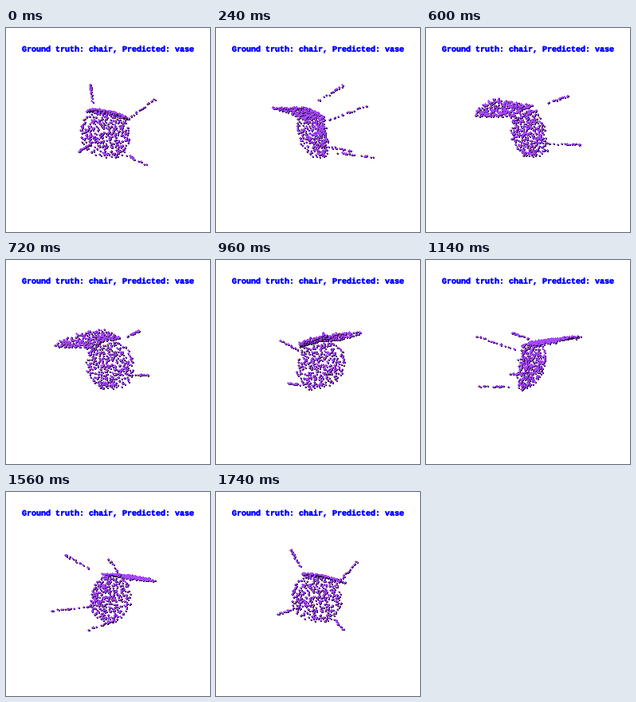
Write a matplotlib script that moves like this. It is 256 by 256 pixels and loops after 1.8 s.

```python
import numpy as np
import matplotlib.pyplot as plt
from matplotlib.animation import FuncAnimation
from matplotlib.patheffects import withStroke

SIZE, FRAMES, STEP_MS = 256, 30, 60
CAMERA = 221.7  # distance in pixels, a 60 degree field of view
FILL, EDGE = (166, 72, 255), (46, 20, 70)
BLUE = "#0000ff"
rng = np.random.default_rng(7)


def unit(v):
    v = np.array(v, float)
    return v / np.linalg.norm(v)


SIDE = unit((0.965, -0.2, -0.14))
UP = unit((0.13, 0.967, -0.213))
NORMAL = np.cross(SIDE, UP)
CENTER = np.array((-2.5, -4, -0.5))


def seat(n):
    """Rounded panel whose sides curl backwards."""
    s, t = rng.uniform(-1, 1, (2, n * 2))
    keep = (np.abs(s) ** 2.3 + np.abs(t) ** 2.3 < 1) & (t < 0.9)
    s, t = s[keep][:n, None], t[keep][:n, None]
    curl = rng.normal(0, 1, s.shape) - 5 * s ** 2
    return CENTER + 32.5 * s * SIDE + 30 * t * UP + curl * NORMAL


def back(n):
    """Panel between two edges, arched across its width."""
    mid = CENTER + 27 * UP
    near = mid - 25 * SIDE, mid + 24 * SIDE
    far = np.array((-35.5, 29.5, -56)), np.array((30.5, 17.5, -61))
    s, t = rng.uniform(0, 1, (2, n, 1))
    left = near[0] + (far[0] - near[0]) * t
    right = near[1] + (far[1] - near[1]) * t
    arch = 12 * s * (1 - s) + rng.normal(0, 0.4, (n, 1))
    return left + (right - left) * s + arch * UP


def leg(base, tip, n=22):
    base, tip = np.array(base, float), np.array(tip, float)
    t = np.append(rng.uniform(0, 1, n - 1), 1)[:, None]
    return base + (tip - base) * t + rng.uniform(-0.8, 0.8, (n, 3))


cloud = np.vstack([
    seat(430),
    back(400),
    leg((-19, 27, 0), (-17.5, 44.5, 49)),
    leg((25, 15, -3), (47, 31.5, 42)),
    leg((21, -29, 9), (35, -32, 56)),
    leg((-20, -15, 8), (-26, -19, 63)),
])


def render(angle):
    """Perspective view with dots shaded where the depth jumps."""
    x, y, z = cloud.T
    c, s = np.cos(angle), np.sin(angle)
    x, z = x * c + z * s, z * c - x * s
    k = CAMERA / (CAMERA - z)
    cols = np.rint(SIZE / 2 + k * x).astype(int)
    rows = np.rint(SIZE / 2 - k * y).astype(int)

    img = np.full((SIZE, SIZE, 3), 255, np.uint8)
    depth = np.full((SIZE, SIZE), -1e3)
    for i in np.argsort(z):
        r, q, d = rows[i], cols[i], z[i]
        for a, b in ((r + 1, q), (r, q + 1), (r + 1, q + 1)):
            if d - depth[a, b] > 8:
                img[a, b], depth[a, b] = EDGE, d
        for a, b in ((r, q), (r - 1, q), (r, q - 1)):
            img[a, b], depth[a, b] = FILL, d
    return img


fig = plt.figure(figsize=(2.56, 2.56), dpi=100, facecolor="white")
ax = fig.add_axes([0, 0, 1, 1])
ax.axis("off")
view = ax.imshow(render(0), interpolation="none", aspect="auto")
fig.text(20 / SIZE, 1 - 29.5 / SIZE, "Ground truth: chair, Predicted: vase",
         family="Liberation Mono", weight="bold", size=7.2, color=BLUE,
         path_effects=[withStroke(linewidth=0.3, foreground=BLUE)])


def update(i):
    view.set_data(render(2 * np.pi * i / FRAMES))
    return [view]


anim = FuncAnimation(fig, update, frames=FRAMES, interval=STEP_MS,
                     repeat=True, repeat_delay=0)
plt.show()
```
